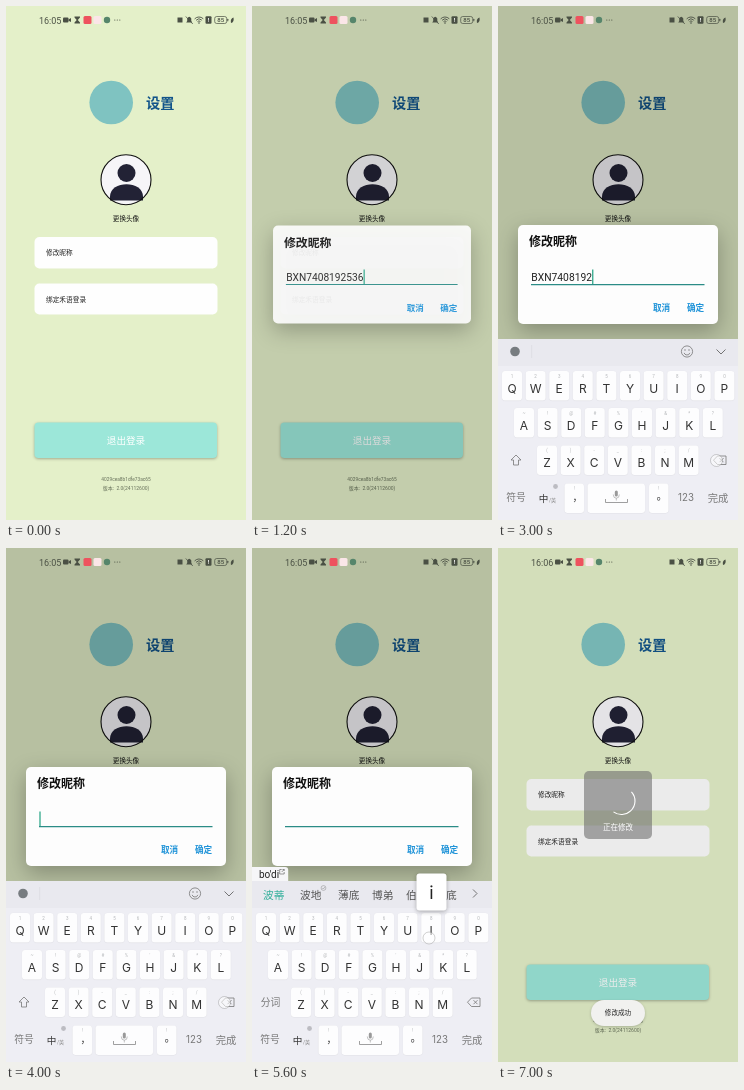
These frames come from a looping animation (240 px wide and 514 px high, 7.1 s). An HTML page with a canvas:

```html
<!DOCTYPE html>
<html lang="zh-CN">
<head>
<meta charset="utf-8">
<title>设置</title>
<style>
html, body { margin: 0; width: 100%; height: 100%; overflow: hidden; background: #e4f0c9; }
canvas { display: block; width: 240px; height: 514px; }
</style>
</head>
<body>
<canvas id="stage"></canvas>
<script>
const W = 240, H = 514, LOOP = 7100;
const canvas = document.getElementById('stage');
const ratio = window.devicePixelRatio || 1;
canvas.width = W * ratio;
canvas.height = H * ratio;
const c = canvas.getContext('2d');

const SANS = 'Roboto, "Noto Sans CJK SC", "Noto Sans CJK", sans-serif';
const KEYS = 'Inter, "Noto Sans CJK SC", "Noto Sans CJK", sans-serif';
const OLD_NAME = 'BXN7408192536', NEW_NAME = 'Bodira';
const TEAL = '#2b8c86', CURSOR = '#3fae93';

// Key presses: time, letter, composed pinyin, suggestions
const strokes = [
  [4900, 'b', 'b', '不 吧 把 被 比 别'],
  [5080, 'o', 'bo', '波 播 博 拨 薄 伯'],
  [5300, 'd', "bo'd", '波动 博得 薄的 波段 拨打 不'],
  [5520, 'i', "bo'di", '波蒂 波地 薄底 博弟 伯地 底'],
  [5800, 'r', "bo'di'r", '波蒂 波地 薄底 博弟 伯地 底'],
  [5980, 'a', "bo'di'ra", NEW_NAME + '  波蒂 薄底 博弟 伯地']
];
const COMMIT = 6300, DELETE_START = 2500, REPEAT_START = 2900, REPEAT = 80;
const DELETE_END = REPEAT_START + REPEAT * (OLD_NAME.length - 2);

const rows = [
  { keys: 'QWERTYUIOP', hints: '1234567890', x: 14, y: 365 },
  { keys: 'ASDFGHJKL', hints: "~!@#%'&*?", x: 26, y: 402 },
  { keys: 'ZXCVBNM', hints: '()-_:;/', x: 49, y: 439.5 }
];
const PITCH = 23.6;

const clamp = v => Math.max(0, Math.min(1, v));
const ramp = (t, a, b) => clamp((t - a) / (b - a));
const easeOut = p => 1 - (1 - p) ** 3;
const within = (t, a, b) => t >= a && t < b;

function text(s, x, y, size, color, { align = 'left', weight = 400, font = SANS } = {}) {
  c.font = `${weight} ${size}px ${font}`;
  c.textAlign = align;
  c.fillStyle = color;
  c.fillText(s, x, y + size * 0.37);
}
const label = (s, x, y, size, color, options) =>
  text(s, x, y, size, color, { align: 'center', ...options });

function box(x, y, w, h, r, color, shadow = 0, alpha = 0.2) {
  c.save();
  if (shadow) {
    c.shadowColor = `rgba(0,0,0,${alpha})`;
    c.shadowBlur = shadow * ratio;
    c.shadowOffsetY = shadow * ratio / 3;
  }
  c.fillStyle = color;
  c.beginPath();
  c.roundRect(x, y, w, h, r);
  c.fill();
  c.restore();
}

function disc(x, y, r, color) {
  c.fillStyle = color;
  c.beginPath();
  c.arc(x, y, r, 0, Math.PI * 2);
  c.fill();
}

function arc(x, y, r, from, to, color, width) {
  c.strokeStyle = color;
  c.lineWidth = width;
  c.beginPath();
  c.arc(x, y, r, from, to);
  c.stroke();
}

function stroke(d, color, width = 0.8) {
  c.strokeStyle = color;
  c.lineWidth = width;
  c.stroke(new Path2D(d));
}

function fillPath(d, color) {
  c.fillStyle = color;
  c.fill(new Path2D(d));
}

function touch(x, y) {
  disc(x, y, 6, 'rgba(255,255,255,.55)');
  arc(x, y, 6, 0, Math.PI * 2, 'rgba(110,110,110,.4)', 0.8);
}

function statusBar(t) {
  const ink = '#4a5044';
  text(t < 6200 ? '16:05' : '16:06', 33, 14.3, 9, ink);
  box(57, 11.5, 5.5, 5, 1, ink);
  fillPath('M62.5 13.5 L65 12 V16 L62.5 14.7 Z', ink);
  fillPath('M68.5 10.5 H74 V11.5 L71.8 14 L74 16.5 V17.5 H68.5 V16.5 L70.7 14 L68.5 11.5 Z', ink);
  box(77.5, 10, 8, 8, 1.5, '#ee525e');
  box(87.5, 10, 8, 8, 1.5, '#fbe6e8');
  disc(101, 14, 3.2, '#56856b');
  for (let i = 0; i < 3; i++) disc(108.8 + i * 2.5, 14, 0.6, ink);

  box(171.5, 11.5, 5, 5, 0, ink);
  fillPath('M180.2 16.5 L181.2 15 V12.5 Q183.3 9 185.3 12.5 V15 L186.3 16.5 Z', ink);
  stroke('M179.8 10.5 L186.8 18', ink);
  for (let i = 1; i < 4; i++) arc(193, 17, i * 2, -Math.PI * 0.76, -Math.PI * 0.24, ink, 0.9);
  disc(193, 17, 0.8, ink);
  box(199.5, 10.2, 6, 7.6, 1, ink);
  label('!', 202.5, 14, 6, '#fff', { weight: 700 });
  c.strokeStyle = ink;
  c.lineWidth = 0.7;
  c.beginPath();
  c.roundRect(208.7, 10.5, 12, 7, 2);
  c.stroke();
  box(221.3, 12.7, 1, 2.6, 0.5, ink);
  label('85', 214.7, 14, 6, ink, { weight: 500 });
  fillPath('M225 17 Q224 12.5 227.5 11.5 Q228.3 16.3 225 17 Z', ink);
}

function avatar() {
  const ink = '#222235';
  disc(120, 173.8, 25, '#f6f5f8');
  disc(120.5, 167, 9, ink);
  fillPath('M104 194.5 V190.5 C104 174 137 174 137 190.5 V194.5 Z', ink);
  arc(120, 173.8, 25, 0, Math.PI * 2, '#111', 1.1);
}

function page(t) {
  c.fillStyle = '#e4f0c9';
  c.fillRect(0, 0, W, H);
  disc(105.2, 96.5, 21.8, '#7fc3c1');
  text('设置', 140, 97, 14.2, '#12548a', { weight: 700 });
  avatar();
  label('更换头像', 120, 212.3, 6.6, '#111', { weight: 500 });

  const pressed = within(t, 700, 1000);
  box(28.5, 231, 183, 31.5, 5, pressed ? '#eeeeec' : '#fefefe');
  box(28.5, 277.5, 183, 31, 5, '#fefefe');
  text('修改昵称', 40, 247, 6.7, '#222', { weight: 500 });
  text('绑定禾语登录', 40, 293.2, 6.7, '#222', { weight: 500 });
  box(28.5, 416.5, 182.5, 35.5, 4, '#9ce7d9', 3, 0.3);
  label('退出登录', 120, 434.5, 9.6, '#fff', { weight: 500 });
  label('4029cea8b1dfe73ac65', 120, 472.8, 4.8, '#66705a');
  label('版本:  2.0(24112600)', 120, 482.5, 5, '#66705a');
  if (within(t, 700, 900)) touch(134, 249);
}

function fieldText(t) {
  if (t >= COMMIT) return NEW_NAME;
  if (t < DELETE_START) return OLD_NAME;
  const removed = t < REPEAT_START ? 1 : 2 + Math.floor((t - REPEAT_START) / REPEAT);
  return OLD_NAME.slice(0, Math.max(0, OLD_NAME.length - removed));
}

function cursorVisible(t) {
  if (t >= 6500) return false;
  if (t >= COMMIT) return true;
  if (t >= DELETE_START && t < DELETE_END) return true;
  return (t - (t < DELETE_START ? 1100 : DELETE_END)) % 1000 < 500;
}

function dialog(t) {
  const shown = ramp(t, 1000, 1220), gone = ramp(t, 6740, 6880);
  const alpha = shown * (1 - gone);
  if (!alpha) return;
  const scale = 0.85 + 0.15 * easeOut(ramp(t, 1000, 1340)) - 0.05 * gone;
  c.save();
  c.globalAlpha = alpha;
  c.translate(120, 268.5);
  c.scale(scale, scale);
  c.translate(-120, -268.5);
  box(20, 219, 200, 99, 5, '#fdfdfd', 22, 0.28);
  text('修改昵称', 31, 236, 12, '#111', { weight: 700 });
  const value = fieldText(t);
  text(value, 33.3, 271.3, 10.3, '#222');
  const end = 33.3 + c.measureText(value).width;
  const focused = t < 6550;
  box(33, 278, 173.5, focused ? 1.2 : 0.7, 0, focused ? TEAL : '#777');
  if (cursorVisible(t)) box(end, 263.5, 1.4, 14.5, 0, CURSOR);
  const pressed = within(t, 6600, 6800);
  if (pressed) box(183, 292, 31, 20, 4, '#dadcdd');
  text('取消', 155, 302, 8.6, '#1f93d8', { weight: 700 });
  text('确定', 189, 302, 8.6, '#1f93d8', { weight: 700 });
  if (pressed) touch(206, 308);
  c.restore();
}

function keyPosition(letter) {
  const row = rows.find(r => r.keys.includes(letter));
  return [row.x + PITCH * row.keys.indexOf(letter), row.y + 15];
}

function toolbar(current) {
  if (!current) {
    disc(17, 345.5, 4.8, '#777c80');
    box(33.5, 339, 0.6, 13, 0, '#d8d8dd');
    arc(189, 345.5, 5.6, 0, Math.PI * 2, '#777', 0.8);
    arc(189, 346, 3, 0.3, Math.PI - 0.3, '#777', 0.8);
    disc(187, 344, 0.7, '#777');
    disc(191, 344, 0.7, '#777');
    stroke('M218.5 343.5 L223 348 L227.5 343.5', '#666', 0.9);
    return;
  }
  const [, , pinyin, options] = current;
  options.split(' ').forEach((word, i) =>
    text(word, [11, 48, 86, 120, 154, 194][i], 347, 10.7, i ? '#555' : '#2fae99'));
  arc(71.5, 340, 2.4, 0, Math.PI * 2, '#888', 0.5);
  stroke('M70.3 340 L71.3 341 L72.8 339', '#888', 0.5);
  stroke('M221 341.5 L225 345.5 L221 349.5', '#666', 0.9);
  c.font = `400 10px ${SANS}`;
  const width = c.measureText(pinyin).width + 16;
  box(0, 319, width, 14, [0, 3, 0, 0], '#f6f6f8');
  text(pinyin, 7, 326.5, 10, '#222');
  const x = width - 8.5;
  stroke(`M${x + 2} 321.5 H${x} V326 H${x + 4.5} V324 M${x + 2} 324 L${x + 4.5} 321.5 H${x + 2.8} M${x + 4.5} 321.5 V323`, '#555', 0.6);
}

function keyboard(t) {
  const slide = easeOut(ramp(t, 1280, 1620)) * (1 - ramp(t, 6740, 6920) ** 2);
  if (!slide) return;
  c.save();
  c.translate(0, 182 * (1 - slide));
  c.fillStyle = '#eeeef4';
  c.fillRect(0, 333, W, H);
  c.fillStyle = '#e9e9ef';
  c.fillRect(0, 333, W, 27);
  const typed = strokes.filter(s => t >= s[0]);
  const current = t < COMMIT ? typed.at(-1) : null;
  toolbar(current);

  const key = (x, y, w) => box(x, y, w, 29.5, 3, '#fdfdfe', 1, 0.1);
  for (const { keys, hints, x, y } of rows) {
    [...keys].forEach((letter, i) => {
      const cx = x + PITCH * i;
      key(cx - 10, y, 20);
      label(hints[i], cx, y + 5, 4.5, '#b5b7ba');
      label(letter, cx, y + 17.3, 12, '#333', { font: KEYS });
    });
  }
  if (current) label('分词', 18.5, 454.5, 9.8, '#777');
  else stroke('M18 449 L23 454 H20.5 V459 H15.5 V454 H13 Z', '#777', 0.8);
  stroke('M219.5 450 H228 V458.5 H219.5 L215.5 454.2 Z M221.5 452.2 L225.5 456.2 M225.5 452.2 L221.5 456.2', '#777', 0.8);

  label('符号', 18, 491.7, 9.8, '#777');
  label('中', 45.5, 492, 9.6, '#333', { weight: 500 });
  label('/英', 54.5, 494.5, 5, '#888');
  disc(57.5, 480.5, 2.4, '#bcbcc2');
  key(66.5, 477.5, 19.5);
  label('，', 79.5, 491.5, 10, '#333');
  key(89.5, 477.5, 57.5);
  box(116.8, 484.5, 3, 6, 1.5, '#999');
  stroke('M115.3 488.5 Q115.3 492.2 118.3 492.2 Q121.3 492.2 121.3 488.5 M118.3 492.2 V494.5', '#999', 0.6);
  stroke('M107.5 493 V496.5 H129.5 V493', '#888', 0.8);
  key(151, 477.5, 19.5);
  label('。', 164, 490, 11, '#333');
  for (const x of [76.3, 160.7]) label('!', x, 482.5, 4.5, '#b5b7ba');
  label('123', 188, 491.7, 9.7, '#777', { font: KEYS });
  label('完成', 220, 491.7, 10.3, '#777');

  const active = typed.at(-1);
  if (active && t < active[0] + 150) {
    const [x, y] = keyPosition(active[1].toUpperCase());
    const left = Math.max(2, Math.min(208, x - 14.7));
    box(left, y - 54.5, 30, 37, 3, '#fff', 4, 0.3);
    label(active[1], left + 15, y - 35.5, 18, '#222', { font: KEYS });
    touch(x - 2.2, y + 10);
  }
  if (within(t, DELETE_START - 60, 4100)) touch(218.5, 454.5);
  if (within(t, COMMIT - 100, COMMIT + 60)) touch(22, 348);
  c.restore();
}

function loading(t) {
  const alpha = ramp(t, 6820, 6980);
  if (!alpha) return;
  c.save();
  c.globalAlpha = alpha;
  box(86, 223, 68, 68, 5, 'rgba(112,112,112,.6)');
  const turn = (t - 7000) / 1000 * Math.PI * 2;
  arc(123.5, 253, 13.5, turn - 0.75, turn + 2.2, '#fff', 1.1);
  label('正在修改', 120, 279, 7.5, '#fff');
  box(93, 452, 54, 26, 13, '#f1f1ef', 3, 0.2);
  label('修改成功', 120, 465, 6.6, '#222', { weight: 500 });
  c.restore();
}

function draw(t) {
  c.setTransform(ratio, 0, 0, ratio, 0, 0);
  page(t);
  const fade = ramp(t, 6740, 6960);
  const dim = 0.2 * ramp(t, 1000, 1280) * (1 - fade) + 0.075 * fade;
  c.fillStyle = `rgba(0,0,0,${dim})`;
  c.fillRect(0, 0, W, H);
  statusBar(t);
  dialog(t);
  keyboard(t);
  loading(t);
}

const start = performance.now();
function frame() {
  draw((performance.now() - start) % LOOP);
  requestAnimationFrame(frame);
}
frame();
</script>
</body>
</html>
```
